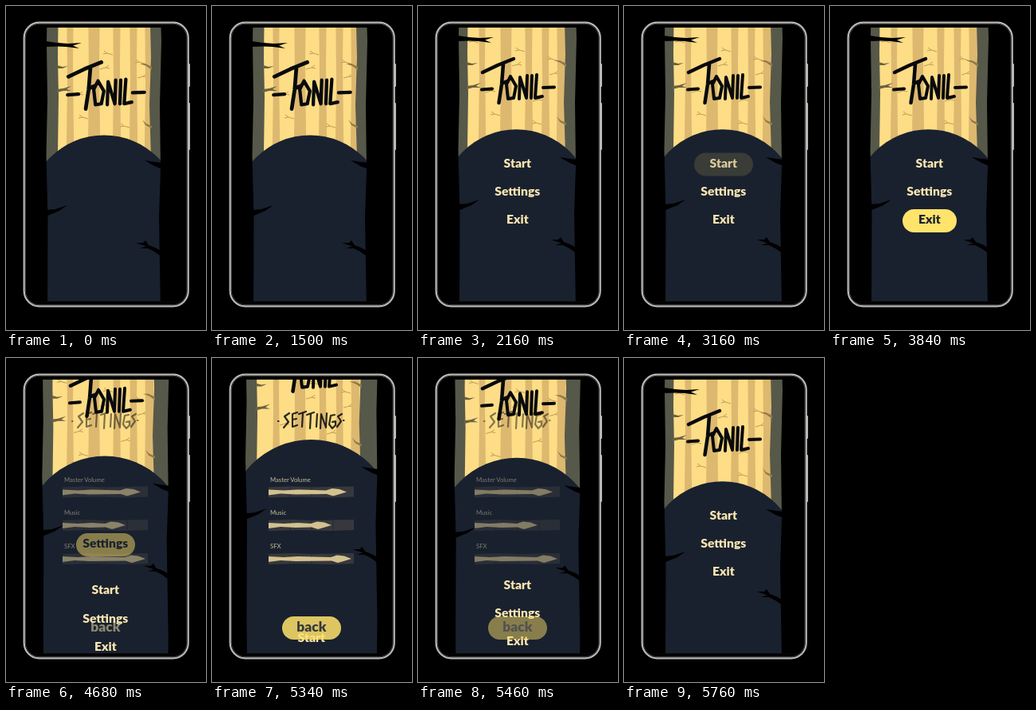
An HTML page for the animation above (7.42 s loop, 251 by 405 pixels).

```html
<!DOCTYPE html>
<html lang="en">
<head>
<meta charset="utf-8">
<title>Game menu</title>
<style>
  html, body { margin: 0; width: 100%; height: 100%; overflow: hidden; background: #000; }
  svg { display: block; width: 100%; height: 100%; }
  text { font-family: Lato, sans-serif; }
  .item { font-weight: 900; text-anchor: middle; fill: #fbe6b0; }
  .dark { fill: #19212f; }
  .label { font-size: 7.7px; fill: #e6d8aa; }
  .ink { fill: none; stroke: #080a0c; stroke-linejoin: round; stroke-linecap: round; }
</style>
</head>
<body>
<svg viewBox="0 0 251 405">
  <defs><clipPath id="screen"><rect x="27" y="27" width="198" height="342.3"/></clipPath></defs>
  <rect width="251" height="405"/>
  <g clip-path="url(#screen)">
    <rect x="40" y="26" width="170" height="200" fill="#fddd86"/>
    <g id="forest"></g>
    <g id="barkLeft" fill="#565849">
      <path d="M20 -20H63L62 60L63 110L62 180L64 300H20Z"/>
      <path fill="#6d6141" d="M61 100L69 99L79 96L73 100L79 102L69 102L61 104ZM61 70L68 72L75 71L68 74L61 74Z"/>
    </g>
    <g id="barkRight" fill="#565849">
      <path d="M230 -20H183L185 60L183 120L185 186L186 300H230Z"/>
      <path fill="#8f7a48" d="M186 72L178 68L171 68L179 71L186 76ZM186 146L179 143L174 138L178 145L186 149Z"/>
    </g>
    <g id="title" class="ink" stroke-width="4">
      <path d="M80 104.5L93 103.5M157 102L171 101.5"/>
      <path stroke-width="4.5" d="M81 83L100 74L120 66M107 73L105 98L101.5 121M105 97L112 94"/>
      <path d="M116 88L111 98L113 116L120 115L123 100L116 88M127 116L128 89L136 115L137 87M143 87L142 115M149 86L147 115L156 113"/>
    </g>
    <g id="heading" class="ink" stroke-width="2.2">
      <path d="M83 79h.5M165 78h.5"/>
      <path d="M97 69L91 73L96 80L90 87M107 68L101 70L101 86L107 84M101 77L106 76M109 70L118 67M114 69L113 86M119 71L128 68M124 70L123 88M132 70L131 86M136 88L137 70L143 87L144 69M154 71L149 72L147 83L151 88L155 84V79L151 80M163 70L158 73L162 79L157 86"/>
    </g>
    <rect id="hill" height="500" fill="#19212f"/>
    <g id="items"></g>
    <g id="options"></g>
    <g id="pills"></g>
    <g id="trunkLeft">
      <path d="M0 -30H52L51 40L52 110L50.5 180L52.5 260L52 380L53 470H0Z"/>
      <path d="M50 37L64 39L78 40L95 39L84 42.5L92 46L76 44L64 43.5L50 44ZM50 248L62 247L77 242L67 249L50 256Z"/>
    </g>
    <g id="trunkRight">
      <path d="M240 -30H197L199 40L197 120L198 200L196 260L198 380L197 470H240Z"/>
      <path d="M200 200L190 196L178 189L191 191L200 192ZM200 310L190 303L182 299L172 299L180 296.5L167 292L176 292L179 289L183 295L191 298L200 303Z"/>
    </g>
  </g>
  <g fill="#bcb9b6">
    <rect x="228.5" y="72" width="2.5" height="29" rx="1"/>
    <rect x="228.5" y="121" width="2.5" height="59" rx="1"/>
  </g>
  <rect x="22.7" y="20.7" width="206" height="354.6" rx="19" fill="none" stroke="#bcb9b6" stroke-width="2.2"/>
  <rect x="24.4" y="22.4" width="202.6" height="351.2" rx="17.5" fill="none" stroke="#4b4845" stroke-width="1"/>
</svg>
<script>
const LOOP = 7420;
const $ = id => document.getElementById(id);
const clamp = x => Math.min(1, Math.max(0, x));
const easeOut = x => 1 - (1 - clamp(x)) ** 1.72;
const move = (t, start) => easeOut((t - start) / 465);
const fade = (t, start) => clamp((t - start) / 80);
const shift = (id, x, y) => $(id).setAttribute('transform', `translate(${x} ${y})`);

// Distant trees: [left edge, width], each with two twigs
const trees = [[76, 9], [103, 15], [134, 10], [155, 10], [174, 12]];
$('forest').innerHTML = trees.map(([x, w], i) => {
  const twigs = [0, 1].map(k => {
    const y = 46 + k * 62 + i * 29 % 47, dir = (i + k) % 2 ? 1 : -1, foot = dir > 0 ? x + w : x;
    return `<path d="M${foot} ${y}l${dir * 7} -2l${dir * 4} -3m${-dir * 4} 3l${dir * 5} 1" fill="none" stroke="#c29b57"/>`;
  }).join('');
  return `<path fill="#ddb86f" d="M${x} -20H${x + w}L${x + w - 1} 70L${x + w + 1} 240H${x - 1}L${x + 1} 90Z"/>${twigs}`;
}).join('');

const items = [['Start', 198, 74], ['Settings', 233.5, 74], ['Exit', 268.5, 68]];
const itemText = (name, y, size = 15.7, tone = '') =>
  `<text x="124.8" y="${y + size / 4}" font-size="${size}" class="item ${tone}">${name}</text>`;
const pill = (name, y, w, size) => `<g opacity="0">
  <rect x="${125 - w / 2}" y="${y - 14.5}" width="${w}" height="29" rx="14.5" fill="#ffe36b"/>${itemText(name, y, size, 'dark')}</g>`;
$('items').innerHTML = items.map(([name, y]) => itemText(name, y)).join('');
$('pills').innerHTML = items.map(([name, y, w]) => pill(name, y, w)).join('') + pill('back', 337.5, 74, 17.4);

const slider = (name, y, end) => `<text x="73" y="${y - 13}" class="label">${name}</text>
  <path fill="#3d3d40" d="M71 ${y - 6}L98 ${y - 7}L126 ${y - 6}L178 ${y - 7}V${y + 6}L150 ${y + 7}L110 ${y + 6}L71 ${y + 7}Z"/>
  <path stroke="#202630" stroke-width=".8" d="M98 ${y - 6}v12M125 ${y - 6}v12M152 ${y - 6}v12"/>
  <path fill="#f3dda0" d="M71 ${y - 3}L90 ${y - 2}L108 ${y - 3}L${end - 26} ${y - 2}L${end - 18} ${y - 4.5}L${end - 9} ${y - 3.5}L${end} ${y}L${end - 10} ${y + 3}L${end - 17} ${y + 5}L${end - 25} ${y + 2.5}L105 ${y + 3}L86 ${y + 2}L71 ${y + 4}Z"/>`;
$('options').innerHTML = slider('Master Volume', 167.5, 169) + slider('Music', 209, 150) + slider('SFX', 251, 175)
  + itemText('back', 337.5, 17.4);

function draw(t) {
  const opened = move(t, 1640);
  const settings = move(t, 4520) - move(t, 5300);
  // Blend of the title, menu and settings poses
  const mix = (title, menu, options) => title + (menu - title) * opened + (options - menu) * settings;

  const radius = mix(96, 95, 107), center = mix(123, 123.5, 124.5);
  for (const [name, value] of Object.entries({ x: center - radius, y: mix(161.5, 154.2, 93), width: 2 * radius, rx: radius, ry: radius }))
    $('hill').setAttribute(name, value);

  shift('forest', 0, mix(4, 0, -28));
  shift('barkLeft', mix(3, 0, -7), mix(4, 0, -45));
  shift('barkRight', mix(-3, 0, 2), mix(4, 0, -45));
  shift('trunkLeft', mix(0, 0, -10), mix(7, 0, -63));
  shift('trunkRight', mix(-4, 0, 11), mix(4, 0, -62));
  shift('items', 0, mix(180, 0, 180));
  const scale = mix(1.06, 1, 1);
  $('title').setAttribute('transform', `translate(125.7 ${94 + mix(6, 0, -93)}) scale(${scale}) translate(-125.7 -94)`);
  $('heading').setAttribute('opacity', settings);
  $('options').setAttribute('opacity', settings);

  const glow = [
    fade(t, 3150) - fade(t, 3350),
    fade(t, 3350) - fade(t, 3560) + fade(t, 4040) - move(t, 4520),
    fade(t, 3560) - fade(t, 4040),
    fade(t, 5190) - move(t, 5300)
  ];
  glow.forEach((value, i) => $('pills').children[i].setAttribute('opacity', value));
}

const begin = performance.now();
function tick() {
  draw((performance.now() - begin) % LOOP);
  requestAnimationFrame(tick);
}
tick();
</script>
</body>
</html>
```
